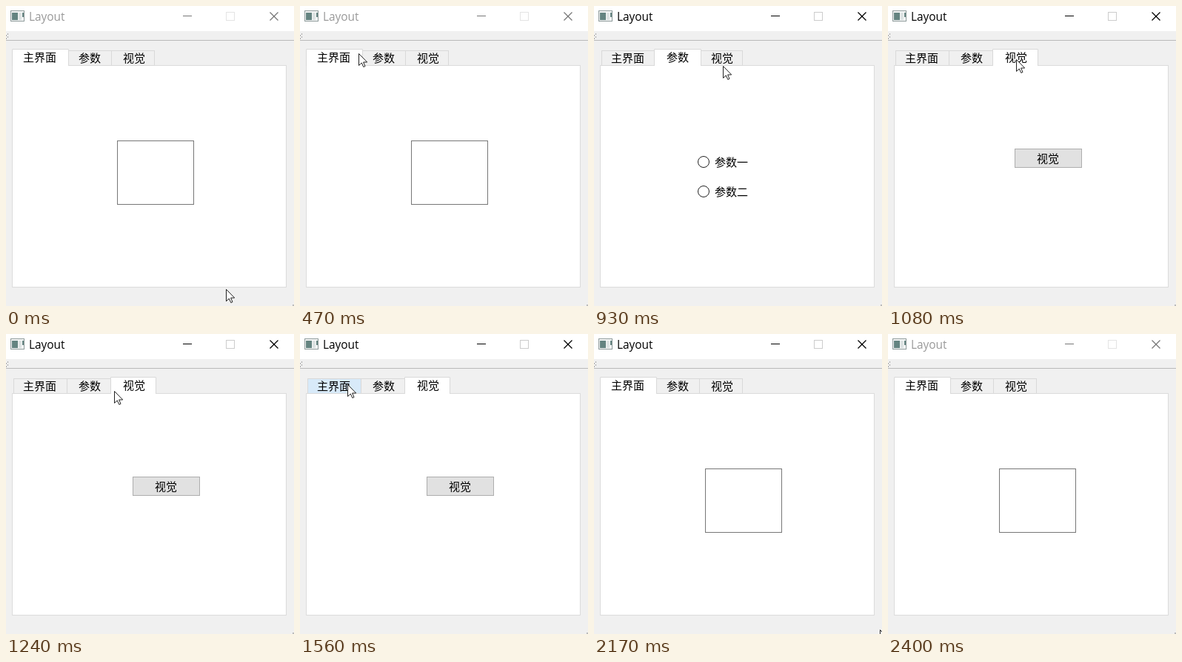
Recreate the animation shown at these times as an HTML page with a canvas. Size 389 by 406 pixels, loop 2.57 s.

```html
<!DOCTYPE html>
<html lang="zh">
<head>
<meta charset="utf-8">
<style>
html, body { margin: 0; width: 100%; height: 100%; overflow: hidden; background: #f0f0f0; }
canvas { display: block; }
</style>
</head>
<body>
<canvas id="stage" width="389" height="406"></canvas>
<script>
const g = document.getElementById('stage').getContext('2d');
const LOOP = 2570, STEP = 77.6, LEAD = 8;
const CJK = '300 15px "Noto Sans CJK SC", "Noto Sans CJK", sans-serif';
const LATIN = '15.4px "Open Sans", "Noto Sans", sans-serif';
const EM = 15, BAR_LEFT = 8;

// Each tab is as wide as its label plus one em of padding per side.
let barRight = BAR_LEFT;
const tabs = ['主界面', '参数', '视觉'].map(label => {
  const left = barRight;
  barRight += EM * (label.length + 2);
  return { label, left, right: barRight - 1, textX: left + EM };
});
barRight -= 1;

// Key points of the pointer path: [step, x, y]
const path = [
  [0, 297, 383], [5, 49, 58], [6, 79, 64], [8, 112, 69], [12, 174, 81],
  [14, 173, 72], [16, 146, 77], [20, 64, 68], [21, 48, 51], [23, 65, 73],
  [24, 179, 139], [25, 420, 330], [28, 386, 400], [29, 420, 430],
];

function pointerAt(step) {
  const next = path.findIndex(([at]) => at > step);
  if (next < 0) return path.at(-1).slice(1);
  const [from, x0, y0] = path[next - 1];
  const [to, x1, y1] = path[next];
  const u = (step - from) / (to - from);
  const ease = u * u * (3 - 2 * u);
  return [x0 + (x1 - x0) * ease, y0 + (y1 - y0) * ease].map(Math.round);
}

function fill(color, x, y, w, h) {
  g.fillStyle = color;
  g.fillRect(x, y, w, h);
}

function box(x, y, w, h, stroke, color) {
  if (color) fill(color, x, y, w, h);
  g.strokeStyle = stroke;
  g.strokeRect(x + .5, y + .5, w - 1, h - 1);
}

function line(color, ...points) {
  g.beginPath();
  for (const [x, y] of points) g.lineTo(x, y);
  g.strokeStyle = color;
  g.stroke();
}

function text(label, x, y, color = '#000', font = CJK) {
  g.font = font;
  g.fillStyle = color;
  g.fillText(label, x, y);
}

function drawTitleBar(active) {
  const ink = active ? '#000' : '#777';
  fill('#fff', 0, 0, 389, 34);
  box(6, 6, 19, 15, '#8f9b9b', '#f4f6f6');
  fill('#648481', 8, 9, 8, 10);
  fill('#dce2e2', 17, 9, 4, 10);
  fill('#648481', 22, 9, 2, 6);
  text('Layout', 31, 20, active ? '#000' : '#999', LATIN);
  line(ink, [239, 13.5], [251, 13.5]);
  box(297, 8, 12, 12, active ? '#ccc' : '#e4e4e4');
  g.lineWidth = 1.25;
  line(ink, [356.5, 8.5], [367.5, 19.5]);
  line(ink, [367.5, 8.5], [356.5, 19.5]);
  g.lineWidth = 1;
}

function drawToolbar() {
  fill('#f0f0f0', 0, 34, 389, 372);
  fill('#b9b9b9', 0, 46, 389, 1);
  for (let i = 0; i < 4; i++) fill('#a8a8a8', i % 2 ? 0 : 2, 37 + 2 * i, 1, 2);
  fill('#bbb', 387, 404, 2, 2);
}

function drawTab({ label, left, right, textX }, selected, x, y) {
  const inset = selected ? 0 : 2;
  const x0 = Math.max(BAR_LEFT + inset, left - (selected ? 2 : 1));
  const x1 = Math.min(barRight - inset, right + (selected ? 2 : 0));
  if (selected) {
    fill('#fff', x0, 58, x1 - x0 + 1, 23);
    line('#d9d9d9', [x0 + .5, 81], [x0 + .5, 58.5], [x1 + .5, 58.5], [x1 + .5, 81]);
  } else {
    const hover = x >= x0 && x < x1 && y >= 60 && y < 80;
    box(x0, 60, x1 - x0 + 1, 21, '#d9d9d9', hover ? '#d8eaf9' : '#f0f0f0');
  }
  text(label, textX, selected ? 75 : 76);
}

function drawTabs(selected, x, y) {
  box(8, 80, 371, 301, '#dcdcdc', '#fff');
  tabs.forEach((tab, i) => i !== selected && drawTab(tab, false, x, y));
  drawTab(tabs[selected], true, x, y);
}

function drawRadio(label, y) {
  g.beginPath();
  g.arc(148, y, 7.5, 0, Math.PI * 2);
  g.strokeStyle = '#222';
  g.stroke();
  text(label, 163, y + 6);
}

const pages = [
  () => box(150, 182, 104, 87, '#777'),
  () => ['参数一', '参数二'].forEach((label, i) => drawRadio(label, 211 + 40 * i)),
  () => {
    box(171, 193, 91, 26, '#adadad', '#e1e1e1');
    text('视觉', 201, 212);
  },
];

const arrow = new Path2D('M.5 .5V16.5L4.3 13L6.8 18.5L9 17.5L6.6 12H11.7Z');

function drawPointer(x, y) {
  g.save();
  g.translate(x, y);
  g.fillStyle = '#fff';
  g.strokeStyle = '#222';
  g.fill(arrow);
  g.stroke(arrow);
  g.restore();
}

function draw(now) {
  const step = Math.floor((now % LOOP + LEAD) / STEP);
  const [x, y] = pointerAt(step);
  const selected = step < 8 || step >= 21 ? 0 : step < 14 ? 1 : 2;
  drawTitleBar(step >= 8 && step < 31);
  drawToolbar();
  drawTabs(selected, x, y);
  pages[selected]();
  drawPointer(x, y);
}

const began = performance.now();
function tick() {
  draw(performance.now() - began);
  requestAnimationFrame(tick);
}
tick();
</script>
</body>
</html>
```
